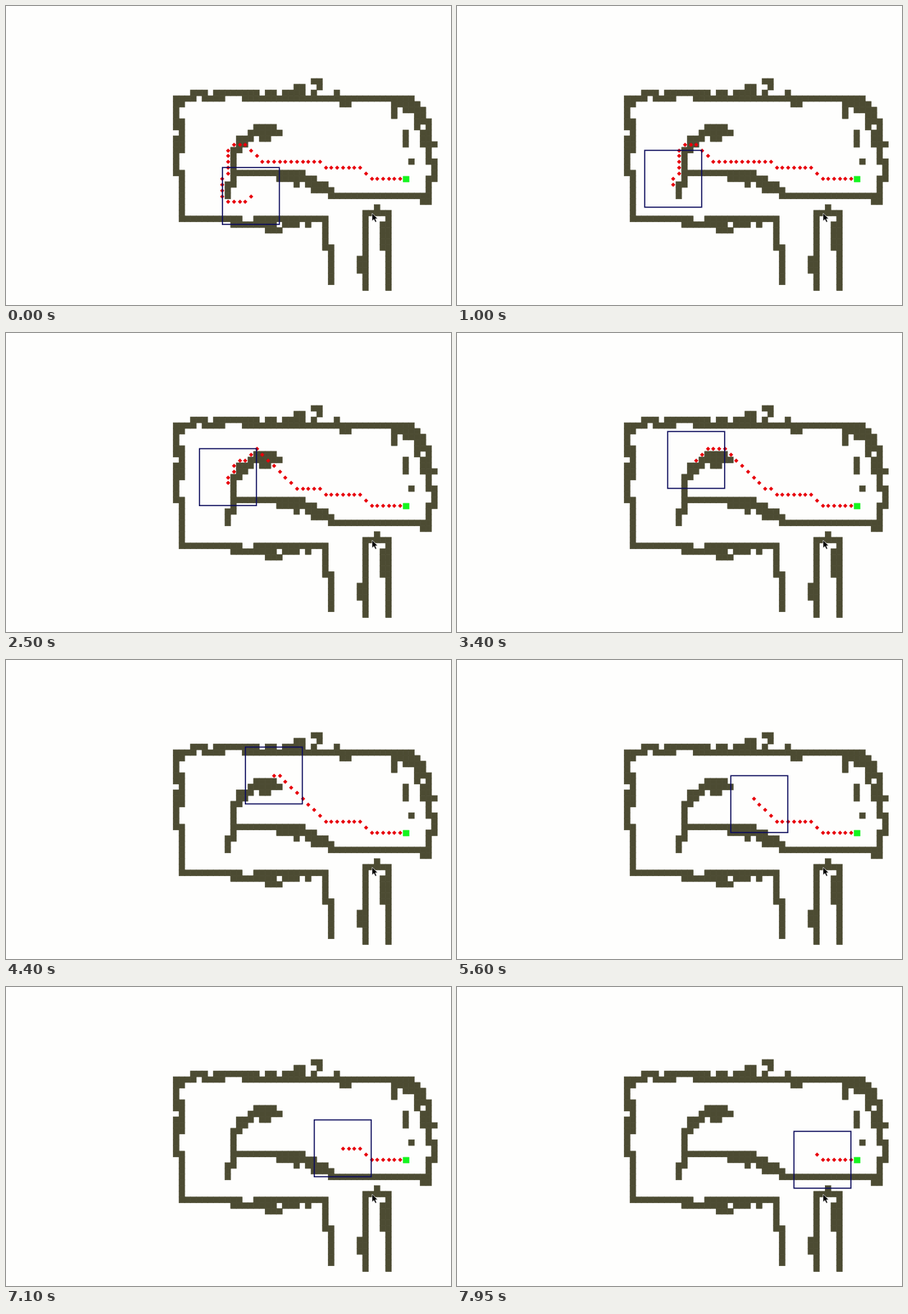
Animation, 600 px wide and 404 px high, one loop 8 s. Source, as a matplotlib script:

```python
import matplotlib.pyplot as plt
import numpy as np
from matplotlib.animation import FuncAnimation
from matplotlib.collections import PatchCollection
from matplotlib.patches import Polygon, Rectangle

W, H, DPI = 600, 404, 100
FRAMES, INTERVAL = 160, 50
PX = 72 / DPI
ORIGIN, CELL = np.array([225.5, 98.0]), 7.74
SIGHT = 5             # cells seen to each side of the robot
LAG = 100             # ms from a move until the path is redrawn


def walk(*corners):
    """All cells along a polyline of straight and diagonal runs."""
    cells = [corners[0]]
    for (c0, r0), (c1, r1) in zip(corners, corners[1:]):
        n = max(abs(c1 - c0), abs(r1 - r0))
        cells += [(c0 + (c1 - c0) * i // n, r0 + (r1 - r0) * i // n)
                  for i in range(1, n + 1)]
    return cells


def centre(cells):
    return ORIGIN + (np.asarray(cells) + 0.5) * CELL


def squares(cells, color, zorder):
    """Grid cells as one collection, with a thin rim that closes the seams."""
    patches = [Rectangle(ORIGIN + np.array(c) * CELL, CELL, CELL) for c in sorted(cells)]
    return PatchCollection(patches, facecolor=color, edgecolor=color,
                           linewidth=0.7 * PX, snap=False, zorder=zorder)


def build_walls():
    strokes = [
        # left side and floor
        walk((3, 3), (0, 3), (0, 8), (1, 9), (0, 10), (0, 16), (1, 16), (1, 24), (11, 24)),
        walk((1, 7), (1, 12)),
        walk((14, 24), (26, 24), (26, 29), (27, 29), (27, 35)),
        walk((10, 25), (17, 25), (16, 26), (18, 26), (19, 25), (21, 25)),
        # ceiling and its bumps
        walk((3, 2), (5, 2), (5, 3), (8, 3), (7, 2), (14, 2), (14, 3), (12, 3),
             (41, 3), (42, 4), (42, 8)),
        walk((16, 2), (17, 2)),
        walk((19, 2), (22, 2), (22, 1), (21, 1)),
        walk((24, 0), (25, 0), (25, 1), (24, 2)),
        walk((29, 4), (30, 4)),
        # right corner, then down and back along the inner floor
        walk((38, 6), (38, 4), (42, 4)),
        walk((40, 5), (43, 5), (43, 7), (44, 7), (44, 14), (45, 14), (45, 17), (44, 17),
             (44, 21), (43, 21), (43, 20), (27, 20), (27, 19), (24, 19), (23, 18),
             (26, 18), (24, 18), (24, 17), (18, 17), (18, 16), (22, 16), (10, 16)),
        walk((43, 9), (43, 11), (45, 11)),
        walk((40, 9), (40, 11)),
        # hook
        walk((9, 20), (9, 18), (10, 18), (10, 12), (11, 12), (11, 10), (13, 10),
             (13, 9), (18, 9), (17, 8), (14, 8)),
        walk((15, 10), (16, 10)),
        # corridor
        walk((36, 25), (36, 29)),
        walk((32, 31), (32, 33)),
    ]
    strokes += [walk((35, 22), (35, 23), (side, 23), (side, 36)) for side in (33, 37)]
    specks = [(1, 4), (28, 2), (41, 14), (12, 11), (21, 18), (23, 25)]
    return set(specks).union(*strokes)


START = [(13, 20), (12, 21), (9, 21), (8, 20), (8, 17), (9, 16), (9, 12), (10, 11)]
CLIMB = [(10, 10), (11, 9)]
HOME = [(25, 14), (26, 15), (32, 15), (34, 17), (40, 17)]


def over_hook(turn):
    """Path along the top of the hook that descends from column `turn`."""
    return walk(*START, *CLIMB, (12, 9), (14, 7), (turn, 7), (turn + 7, 14), *HOME)


ROUTE = over_hook(18)
THROUGH_HOOK = walk(*START, (12, 11), (15, 14), *HOME)
UNDER_CREST = walk(*START, *CLIMB, (13, 9), (18, 14), *HOME)


def plan(step):
    """Best path given the walls seen up to this step."""
    if step < 10:
        path = THROUGH_HOOK
    elif step < 12:
        path = UNDER_CREST
    else:
        path = over_hook(min(max(ROUTE[step][0] + SIGHT, 14), 18))
    return path[step:]


def step_at(ms):
    """Steps made so far: fast start, a pause to replan, then a steady pace."""
    return int(np.interp(ms, [0, 950, 2460, 4290, 7120, 7940], [0, 8, 13, 22, 35, 39]))


fig = plt.figure(figsize=(W / DPI, H / DPI), dpi=DPI, facecolor="#fefefd")
ax = fig.add_axes([0, 0, 1, 1])
ax.set_xlim(0, W)
ax.set_ylim(H, 0)
ax.axis("off")

ax.add_collection(squares(build_walls(), "#4c4b32", zorder=1))
ax.add_collection(squares([ROUTE[-1]], "#14f51e", zorder=2))

dots, = ax.plot([], [], "D", color="#e8000a", ms=4.1 * PX, mew=0, snap=False, zorder=3)
reach = SIGHT * CELL - 0.3
window = ax.add_patch(Rectangle((0, 0), 2 * reach, 2 * reach, fill=False, snap=False,
                                edgecolor="#0b0b5c", linewidth=1.5 * PX, zorder=4))

pointer = np.array([(0, 0), (0, 10.5), (2.4, 8.3), (4.2, 12.2), (6, 11.4),
                    (4.3, 7.6), (7.4, 7.4)]) + (493.7, 280)
ax.add_patch(Polygon(pointer, facecolor="black", edgecolor="white",
                     linewidth=0.5 * PX, zorder=5))


def update(frame):
    ms = frame * INTERVAL
    window.set_xy(centre(ROUTE[step_at(ms)]) - reach + (0.2, 0))
    dots.set_data(*centre(plan(step_at(ms - LAG))[:-1]).T)
    return dots, window


anim = FuncAnimation(fig, update, frames=FRAMES, interval=INTERVAL,
                     repeat=True, repeat_delay=0, blit=False)
plt.show()
```
